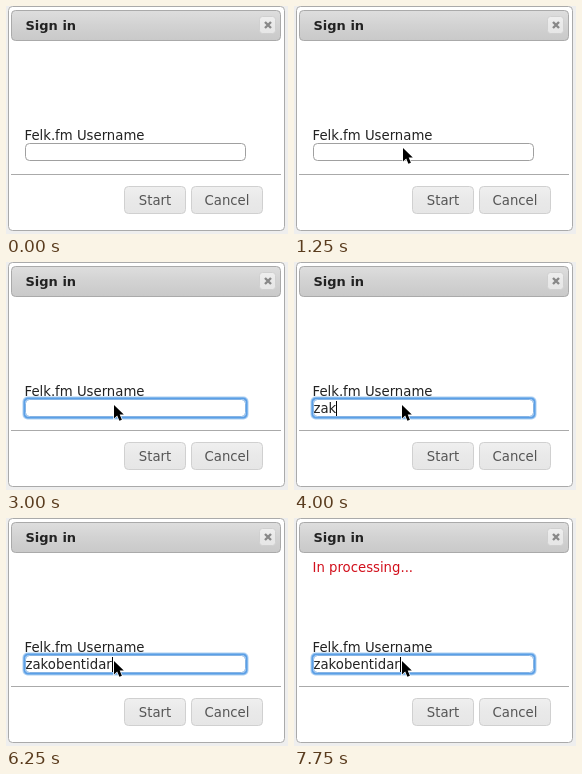
Animation, 282 px wide and 228 px high, one loop 8 s. Source, as an HTML page:

```html
<!DOCTYPE html>
<html lang="en">
<head>
<meta charset="utf-8">
<title>Sign in</title>
<style>
  html, body { margin: 0; width: 100%; height: 100%; overflow: hidden; background: #eee; }
  svg { display: block; width: 282px; height: 228px; }
  text { font: 13.25px "DejaVu Sans", Verdana, sans-serif; fill: #222; white-space: pre; }
  .title { font-weight: bold; font-size: 13px; }
  .error { fill: #d2101c; }
  .button rect { fill: url(#face); stroke: #d0d0d0; }
  .button text { fill: #555; text-anchor: middle; }
</style>
</head>
<body>
<svg viewBox="0 0 282 228">
  <defs>
    <linearGradient id="bar" x2="0" y2="1">
      <stop offset="0" stop-color="#dedede"/>
      <stop offset=".5" stop-color="#d2d2d2"/>
      <stop offset="1" stop-color="#c9c9c9"/>
    </linearGradient>
    <linearGradient id="face" x2="0" y2="1">
      <stop offset="0" stop-color="#efefef"/>
      <stop offset=".5" stop-color="#e9e9e9"/>
      <stop offset="1" stop-color="#e6e6e6"/>
    </linearGradient>
  </defs>

  <rect x="2.5" y=".5" width="276" height="224" rx="4" fill="#fff" stroke="#aaa"/>
  <rect x="5.5" y="4.5" width="269" height="30" rx="4" fill="url(#bar)" stroke="#aaa"/>
  <text class="title" x="19.5" y="24">Sign in</text>
  <g class="button">
    <rect x="253.5" y="10.5" width="16" height="17" rx="3"/>
    <path d="M259 16l6 6m0-6l-6 6" stroke="#888" stroke-width="2.4"/>
  </g>

  <text class="error" id="message" x="18.5" y="54">In processing...</text>
  <text x="18.5" y="134">Felk.fm Username</text>
  <g id="ring" fill="none" stroke="#5b9fe6">
    <rect x="17.5" y="135.5" width="224" height="21" rx="4" stroke-opacity=".5" stroke-width="2"/>
    <rect x="18.5" y="136.5" width="222" height="19" rx="3.5" stroke-width="2"/>
  </g>
  <rect id="field" x="19.5" y="137.5" width="220" height="17" rx="4" fill="#fff"/>
  <text id="typed" x="19.5" y="151"></text>
  <rect id="caret" y="139" width="1" height="15" fill="#000"/>

  <path d="M5 168.5h270" stroke="#aaa"/>
  <g class="button">
    <rect x="118.5" y="180.5" width="61" height="27" rx="4"/>
    <text x="149" y="199">Start</text>
  </g>
  <g class="button">
    <rect x="185.5" y="180.5" width="71" height="27" rx="4"/>
    <text x="221" y="199">Cancel</text>
  </g>

  <path id="pointer" d="M0 0V13.4L3.2 10.4 5.4 15.8 7.9 14.8 5.7 9.6H9.8Z"
        fill="#000" stroke="#fff" stroke-width="1.4" paint-order="stroke"/>
</svg>
<script>
  const LOOP = 8000;
  const NAME = "zakobentidar";
  // [time, value] steps; each value holds until the next one
  const TYPED = [[0, 0], [3750, 1], [4000, 3], [4250, 4], [4500, 5], [4750, 6],
                 [5000, 7], [5250, 9], [5750, 10], [6000, 11], [6250, 12]];
  const CARET = [[0, 0], [1500, 1], [2000, 0], [2500, 1], [3000, 0], [3500, 1],
                 [7250, 0], [7750, 1]];
  const POINTER = [[0, null], [1000, [131, 133]], [1250, [109, 142]], [1750, [108, 143]]];

  const get = id => document.getElementById(id);
  const [message, ring, field, typed, caret, pointer] =
    ["message", "ring", "field", "typed", "caret", "pointer"].map(get);

  const at = (steps, t) => steps.filter(s => s[0] <= t).pop()[1];
  const show = (el, on) => el.setAttribute("visibility", on ? "visible" : "hidden");

  function draw(t) {
    const focused = t >= 1500;
    show(ring, focused);
    field.setAttribute("stroke", focused ? "#86b4e4" : "#a0a0a0");

    typed.textContent = NAME.slice(0, at(TYPED, t));
    caret.setAttribute("x", Math.round(19.5 + typed.getComputedTextLength()));
    show(caret, at(CARET, t));

    const pos = at(POINTER, t);
    show(pointer, pos);
    if (pos) pointer.setAttribute("transform", `translate(${pos})`);

    show(message, t >= 6750);
  }

  const start = performance.now();
  function tick() {
    draw((performance.now() - start) % LOOP);
    requestAnimationFrame(tick);
  }
  tick();
</script>
</body>
</html>
```
